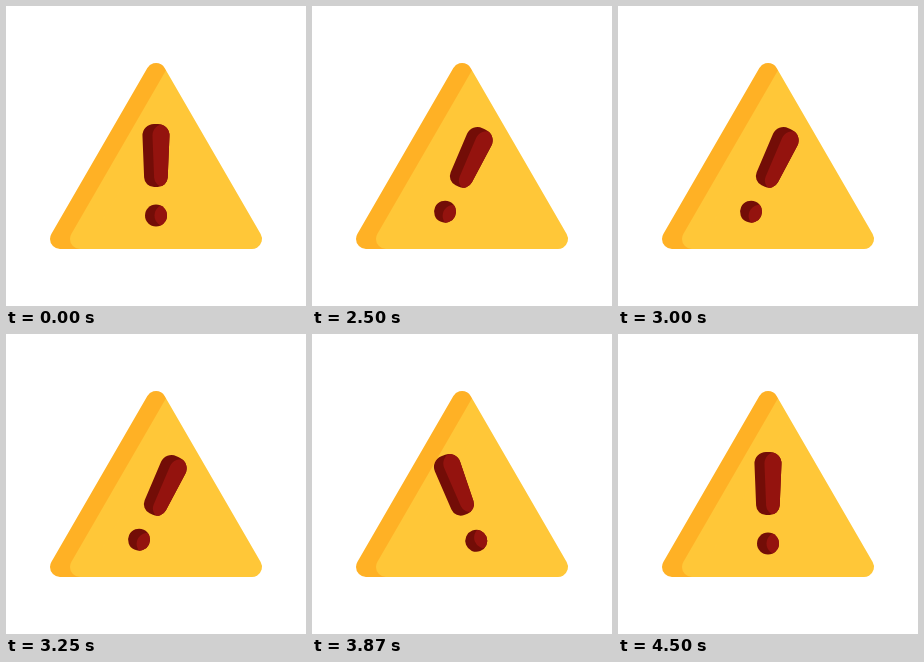
Animation, 300 px wide and 300 px high, one loop 4520 ms. Source, as an HTML page with a canvas:

```html
<!DOCTYPE html>
<html lang="en">
<head>
<meta charset="utf-8">
<title>Warning sign</title>
<style>
html, body { margin: 0; width: 100%; height: 100%; overflow: hidden; background: #fff; }
canvas { display: block; width: 300px; height: 300px; }
</style>
</head>
<body>
<canvas id="stage"></canvas>
<script>
const SIZE = 300, LOOP = 4520, STEP = 25;
const COLORS = { edge: '#ffb125', face: '#ffc738', shade: '#730d07', mark: '#94130e' };
const PIVOT = { x: 150, y: 170 };

// Swing of the exclamation mark: [time, degrees], steady at first, then dying away.
const keys = [[0, 0], [2000, 0]];
for (let i = 0; i < 14; i++) keys.push([2144 + 125 * i, i % 2 ? 29 : -29]);
keys.push([3894, -24.5], [4019, 21.5], [4144, -19], [4269, 12.5], [4394, -6], [4500, 0]);

const canvas = document.getElementById('stage');
const ctx = canvas.getContext('2d');
const ratio = window.devicePixelRatio || 1;
canvas.width = canvas.height = SIZE * ratio;

// Poses are held for one step, and switch on whole hundredths of a second.
function heldTime(t) {
  const next = (Math.floor(t / STEP) + 1) * STEP;
  return Math.floor(next / 10) * 10 <= t ? next : next - STEP;
}

function angleAt(t) {
  const i = keys.findIndex(key => key[0] > t);
  if (i < 0) return 0;
  const [t0, a0] = keys[i - 1], [t1, a1] = keys[i];
  const x = (t - t0) / (t1 - t0);
  return a0 + (a1 - a0) * x * x * (3 - 2 * x);
}

function trianglePath(shift) {
  const path = new Path2D();
  path.moveTo(150 + shift, 67);
  path.lineTo(246 + shift, 233);
  path.lineTo(54 + shift, 233);
  path.closePath();
  return path;
}

function barPath(shift) {
  const path = new Path2D();
  const corners = [[164, 118, 11.5], [161.3, 181, 10], [138.5, 181, 10], [136, 118, 11.5]];
  path.moveTo(150 + shift, 118);
  corners.forEach(([x, y, r], i) => {
    const [nx, ny] = i < 3 ? corners[i + 1] : [150, 118];
    path.arcTo(x + shift, y, nx + shift, ny, r);
  });
  path.closePath();
  return path;
}

function dotPath(shift) {
  const path = new Path2D();
  path.arc(150 + shift, 209.5, 11, 0, Math.PI * 2);
  return path;
}

function drawTriangle() {
  ctx.lineJoin = 'round';
  ctx.lineWidth = 20;
  const paint = (path, color) => {
    ctx.fillStyle = ctx.strokeStyle = color;
    ctx.fill(path);
    ctx.stroke(path);
  };
  paint(trianglePath(0), COLORS.edge);
  ctx.globalCompositeOperation = 'source-atop';
  paint(trianglePath(20), COLORS.face);
  ctx.globalCompositeOperation = 'source-over';
}

function drawShaded(makePath, shift) {
  const outline = makePath(0);
  ctx.fillStyle = COLORS.shade;
  ctx.fill(outline);
  ctx.save();
  ctx.clip(outline);
  ctx.fillStyle = COLORS.mark;
  ctx.fill(makePath(shift));
  ctx.restore();
}

function draw(t) {
  ctx.setTransform(ratio, 0, 0, ratio, 0, 0);
  ctx.clearRect(0, 0, SIZE, SIZE);
  drawTriangle();
  ctx.translate(PIVOT.x, PIVOT.y);
  ctx.rotate(angleAt(heldTime(t)) * Math.PI / 180);
  ctx.translate(-PIVOT.x, -PIVOT.y);
  drawShaded(barPath, 10);
  drawShaded(dotPath, 9.5);
}

const start = performance.now();
function tick() {
  draw((performance.now() - start) % LOOP);
  requestAnimationFrame(tick);
}
tick();
</script>
</body>
</html>
```
